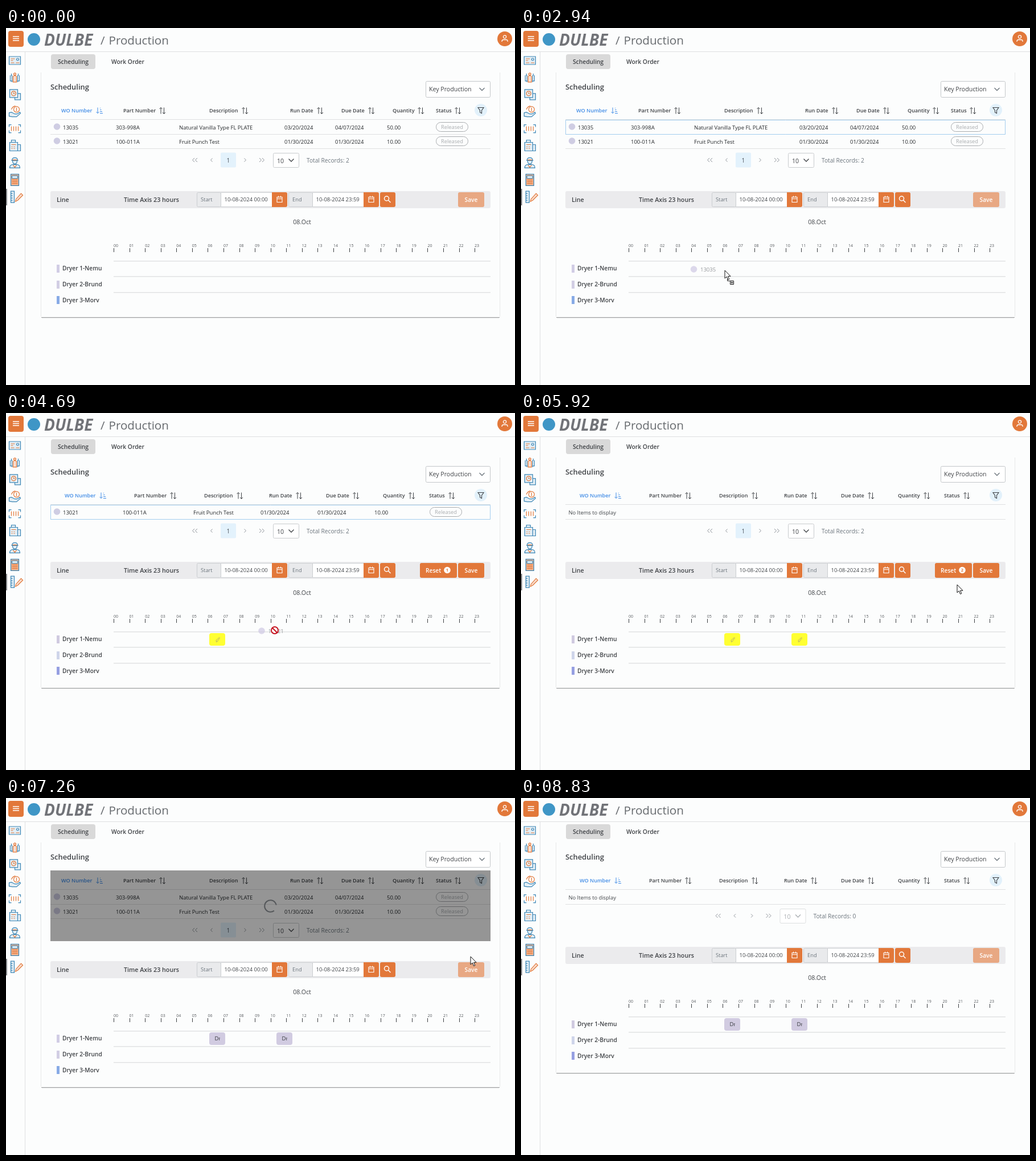
Animation of 894x626 px, one loop 9230 ms. Source, as an HTML page with a canvas:

```html
<!DOCTYPE html>
<html lang="en">
<head>
<meta charset="utf-8">
<title>Production scheduling</title>
<style>
html, body { margin: 0; width: 100%; height: 100%; overflow: hidden; background: #fcfdfd; }
canvas { display: block; }
</style>
</head>
<body>
<canvas id="stage" width="894" height="626"></canvas>
<script>
const g = document.getElementById('stage').getContext('2d');
const LOOP = 9230;
const ORANGE = '#e2783a', BLUE = '#3c86b5', INK = '#3f4246', GREY = '#6c757d', LINE = '#dfe0e1';
const FONT = '"Open Sans", "Noto Sans", sans-serif';

// y is the middle of the capital letters; whole-pixel baselines stay crisp
function text(s, x, y, size = 9.5, color = INK, weight = 400, align = 'left') {
  g.font = `${weight} ${size}px ${FONT}`;
  g.fillStyle = color;
  g.textAlign = align;
  g.fillText(s, x, Math.round(y + size * 0.36));
}
function box(x, y, w, h, r, fill, stroke) {
  g.beginPath();
  g.roundRect(x, y, w, h, r);
  if (fill) { g.fillStyle = fill; g.fill(); }
  if (stroke) { g.strokeStyle = stroke; g.lineWidth = 1; g.stroke(); }
}
function path(d, x, y, stroke, width = 1, fill) {
  const p = new Path2D(d);
  g.save();
  g.translate(x, y);
  if (fill) { g.fillStyle = fill; g.fill(p); }
  if (stroke) { g.strokeStyle = stroke; g.lineWidth = width; g.stroke(p); }
  g.restore();
}
function dot(x, y, r, fill, stroke, width = 1) {
  g.beginPath();
  g.arc(x, y, r, 0, 7);
  if (fill) { g.fillStyle = fill; g.fill(); }
  if (stroke) { g.strokeStyle = stroke; g.lineWidth = width; g.stroke(); }
}
const hline = (x, y, w, color = LINE) => { g.fillStyle = color; g.fillRect(x, y, w, 1); };
const chevron = (x, y, color = GREY) => path('M-4.5 -2L0 2.5L4.5 -2', x, y, color, 1.3);

// Sidebar icons: outline, colour and fill around a common centre
const PERSON = 'M-2 -6a2 2 0 1 0 4 0a2 2 0 1 0 -4 0M-3 8V-2Q0 -5 3 -2V8Z';
const icons = [
  [['M-10 -7H10V7H-10Z', BLUE, '#e3eef5'], ['M-7 -3H0M-7 0H-3M-7 4H-1M2 4H8', ORANGE], ['M3 -2a2 2 0 1 0 4 0a2 2 0 1 0 -4 0', BLUE]],
  [['M-8 -4V6H-4M8 -4V6H4M-6 -7V-3M6 -7V-3M-5 -4V8M5 -4V8', BLUE], [PERSON, ORANGE, '#f8ded0']],
  [['M-9 -9H5V5H-9ZM0 5V9H10V-2H5', BLUE, '#e3eef5'], ['M-6 -2a4 4 0 1 0 8 0a4 4 0 1 0 -8 0M-2 -4V-2H0', ORANGE]],
  [['M-2 -4a5 5 0 1 0 10 0a5 5 0 1 0 -10 0M3 -7V-1M-6 -4Q-4 -9 1 -10', ORANGE], ['M-10 2L-6 1L0 4H4L9 1L10 3L3 9H-5L-10 8Z', BLUE, '#e3eef5']],
  [['M-10 -3V-7H-6M6 -7H10V-3M10 3V7H6M-6 7H-10V3', BLUE], ['M-6 -4V4M-2 -4V4M2 -4V4M6 -4V4', ORANGE]],
  [['M-9 -6H5V9H-9ZM5 -2H10V9H5M-6 -6V-10H1V-6', BLUE, '#e3eef5'], ['M-6 -2H2M-6 2H-4M-2 2H0M-6 5H-4M-2 5H0', ORANGE]],
  [['M-5 -4Q-5 -9 0 -9T5 -4H-6H6M-4 -4Q-4 2 0 2T4 -4M-9 9Q-9 3 -3 3H3Q9 3 9 9Z', BLUE, '#e3eef5'], ['M-3 4L0 8L3 4M-4 -5H4', ORANGE]],
  [['M-7 -10H7V10H-7Z', BLUE, '#f3b38e'], ['M-5 -7H5V-3H-5Z', BLUE, '#fff'], ['M-5 0H5M-5 3H5M-5 6H5', ORANGE]],
  [['M-7 -10H-1V10H-7ZM-7 -6H-4M-7 -2H-4M-7 2H-4M-7 6H-4', BLUE, '#e3eef5'], ['M1 8L2 4L11 -6L14 -3L5 6Z', ORANGE, '#f8ded0']]
];

function shell() {
  g.fillStyle = '#fcfdfd';
  g.fillRect(0, 0, 894, 626);
  hline(0, 41, 894);
  g.fillRect(33, 41, 1, 585);
  box(4, 5, 27, 28, 4, ORANGE);
  path('M0 0H11M0 3.5H11M0 7H11', 12, 15, '#fff', 1.4);
  dot(49, 20, 11, '#3f96c6');
  text('DULBE', 67, 21, 28, '#717378', 'italic 700');
  text('/', 166, 22, 20.6, '#666a6e');
  text('Production', 180.5, 22, 20.6, '#666a6e');
  dot(876, 19, 13, ORANGE);
  path('M-2.6 -3a2.6 2.6 0 1 0 5.2 0a2.6 2.6 0 1 0 -5.2 0M-5 5.5V4.5Q-5 2 -2 2H2Q5 2 5 4.5V5.5', 876, 18.5, '#fff', 1.3);
  icons.forEach((parts, i) => parts.forEach(([d, color, fill]) => path(d, 15.5, 57 + i * 29.9, color, 1.2, fill)));
  g.fillStyle = '#85878a';
  g.fillRect(0, 282, 2, 29);
  box(79, 46, 78, 26, 4, '#d9d9d9');
  text('Scheduling', 118, 59.5, 10.3, INK, 600, 'center');
  text('Work Order', 214, 59.5, 10.3, INK, 600, 'center');
}

function card(dy) {
  g.fillStyle = '#e8e9e9';
  g.fillRect(61, 78, 1, 428 + dy);
  g.fillRect(867, 78, 1, 428 + dy);
  hline(62, 507 + dy, 805, '#a0a2a3');
  hline(63, 508 + dy, 803, '#e2e3e3');
  text('Scheduling', 78, 103, 12.9, INK, 600);
  box(737.5, 93.5, 113, 28, 2, '#fff', '#c3c6c9');
  text('Key Production', 743, 107.5, 10.6);
  chevron(836, 107);
}

const titles = ['WO Number', 'Part Number', 'Description', 'Run Date', 'Due Date', 'Quantity', 'Status'];
const wide = {
  heads: [97, 206, 357, 499, 589, 679, 755],
  sorts: [158, 269, 414, 546, 636, 723, 788],
  cells: [100, 193, 304, 489, 578, 669, 755]
};
const narrow = {
  heads: [103, 225, 348, 462, 562, 662, 743],
  sorts: [164, 288, 405, 509, 609, 707, 777],
  cells: [100, 205, 329, 447, 547, 647, 744]
};
const orders = [
  ['13035', '303-998A', 'Natural Vanilla Type FL PLATE', '03/20/2024', '04/07/2024', '50.00'],
  ['13021', '100-011A', 'Fruit Punch Test', '01/30/2024', '01/30/2024', '10.00']
];

function table(rows, dragging) {
  const cols = rows.length === 2 ? wide : narrow;
  titles.forEach((s, i) => {
    const color = i ? INK : '#3f8be6';
    text(s, cols.heads[i], 145, 9.1, color, 600);
    path(i ? 'M3 0V11M.5 2.5L3 0L5.5 2.5M8.5 0V11M6 8.5L8.5 11L11 8.5'
           : 'M3 0V10M.5 7.5L3 10L5.5 7.5M7 1H8M7 4H9.5M7 7H11M7 10H12', cols.sorts[i], 139.5, color);
  });
  dot(834, 144, 11, '#e2f1fb');
  path('M-5 -5H5L1.5 0V5L-1.5 3.5V0Z', 834, 144.5, INK, 1.1);
  hline(78, 160, 773);
  rows.forEach((row, r) => {
    const y = 174 + r * 25;
    dot(89.5, y - 1, 5.8, '#cfcde3');
    row.forEach((s, i) => text(s, cols.cells[i], y + 0.5, 9.5, '#24272a'));
    const x = cols.cells[6];
    box(x + 0.5, y - 8.5, 56, 16, 8, null, '#a9acaf');
    text('Released', x + 28.5, y, 9.3, '#a9acaf', 400, 'center');
    hline(78, y + 12, 773);
  });
  if (!rows.length) {
    text('No Items to display', 83.5, 174.5, 9.3);
    hline(78, 186, 773);
  }
  if (dragging) box(78.5, 161.5, 772, 25, 0, null, '#a3cdee');
}

function pager(dy, empty) {
  const y = 231.5 + dy, s = empty ? 14.5 : 0;
  const arrow = (d, x) => path(d, x, y, '#8d9399');
  arrow('M-1 -3.5L-4.5 0L-1 3.5M4 -3.5L.5 0L4 3.5', 332 + s);
  arrow('M1.5 -3L-1.5 0L1.5 3', 361 + s);
  arrow('M-1.5 -3L1.5 0L-1.5 3', 420 - s);
  arrow('M1 -3.5L4.5 0L1 3.5M-4 -3.5L-.5 0L-4 3.5', 449 - s);
  if (!empty) {
    box(377, y - 13, 27, 26, 2, '#e3f2fc');
    text('1', 390.5, y + 0.5, 10.2, '#49505a', 400, 'center');
  }
  const pale = empty ? '#a9adb1' : INK;
  box(469.5 - s, y - 12, 45, 25, 2, '#fff', empty ? '#dddfe0' : '#c8cbcd');
  text('10', 476 - s, y + 1.5, 10.5, pale);
  chevron(501 - s, y, pale);
  text('Total Records: ' + (empty ? 0 : 2), 528 - s, y + 0.5, 10.2, GREY);
}

function dateField(x, label, value, y) {
  box(x + 0.5, y + 0.5, 42, 25, 2, '#e9eaec', '#cbced1');
  text(label, x + 7, y + 13, 9.3, GREY);
  box(x + 42.5, y + 0.5, 90, 25, 0, '#fff', '#cbced1');
  text(value, x + 48.5, y + 13, 9.5, '#42464a');
  box(x + 132, y, 27, 26, [0, 3, 3, 0], ORANGE);
  path('M-4.5 -4H4.5V5H-4.5ZM-4.5 -1H4.5M-2 -6V-3M2 -6V-3', x + 145.5, y + 12.5, '#fff', 1.1);
}

function toolbar(dy, pending) {
  const y = 288 + dy;
  box(78, y - 2, 773, 30, 3, '#ebebed');
  text('Line', 89, y + 13.5, 10.7, INK, 600);
  text('Time Axis 23 hours', 207, y + 13.5, 10.7, INK, 600);
  dateField(335, 'Start', '10-08-2024 00:00', y);
  dateField(496, 'End', '10-08-2024 23:59', y);
  box(657, y, 27, 26, 3, ORANGE);
  path('M-5 -1a4 4 0 1 0 8 0a4 4 0 1 0 -8 0M2 2L6 6', 669.5, y + 12, '#fff', 1.5);
  if (pending) {
    box(727, y, 65, 26, 3, ORANGE);
    text('Reset', 737, y + 13.5, 10.2, '#fff', 600);
    dot(775, y + 12.5, 5.8, '#fff');
    text(String(pending), 775, y + 12.5, 7.5, ORANGE, 700, 'center');
  }
  box(794, y, 46, 26, 3, pending ? ORANGE : '#e8a883');
  text('Save', 817, y + 13.5, 10.2, '#fff', 600, 'center');
}

const lanes = ['Dryer 1-Nemu', 'Dryer 2-Brund', 'Dryer 3-Morv'];
function timeline(dy, count, saved) {
  text('08.Oct', 520, 340.5 + dy, 10.6, INK, 400, 'center');
  for (let h = 0; h < 24; h++) {
    const x = 189 + h * 27.57;
    text(String(h).padStart(2, '0'), x, 381.7 + dy, 7, '#55595d');
    g.fillStyle = '#3c3f42';
    g.fillRect(Math.round(x), 386 + dy, 1, 7);
  }
  const tints = dy ? ['#d0cae0', '#cfd5ea', '#969fe2'] : ['#d1cde5', '#d2cee4', '#88abe6'];
  lanes.forEach((name, i) => {
    const y = 421.8 + dy + i * 27.7;
    g.fillStyle = '#e2e3e4';
    g.fillRect(189, Math.round(407.5 + i * 27.7) + dy, 662, 1.5);
    g.fillStyle = tints[i];
    g.fillRect(89, Math.round(y - 7), 5, 14);
    text(name, 99, y, 10.2, INK, 600);
  });
  [357, 475].slice(0, count).forEach(x => {
    const y = 411 + dy;
    box(x, y, 28, 22, 4, saved ? '#d1cbe1' : '#ffff32');
    if (saved) {
      g.save();
      g.beginPath();
      g.rect(x + 8, y, 11, 22);
      g.clip();
      text('Dryer', x + 9.5, y + 11, 9.5, '#33363a');
      g.restore();
    } else path('M-2 4Q-4 1 0 -1L3 -4L4 -3L1 1Q0 4 -2 4Z', x + 14.5, y + 11.5, '#b5ac68', 1);
  });
}

function loading(t, dy) {
  g.fillStyle = 'rgba(0,0,0,.41)';
  g.fillRect(78, 127, 773, 124 + dy);
  const a = 0.9 + (t - 7260) * 0.006;
  g.beginPath();
  g.arc(464.5, 189.5 + dy / 2, 10.3, a, a + 5.2);
  g.strokeStyle = '#55585b';
  g.lineWidth = 2;
  g.stroke();
}

// Pointer moves: start, end, number of steps, evenly spaced points
const moves = [
  [1410, 2110, 6, [[238, 362], [180, 240], [142, 173]]],
  [2390, 2940, 5, [[142, 173], [235, 290], [358, 425]]],
  [3220, 4170, 8, [[358, 425], [320, 390], [185, 245], [114, 176], [112, 173]]],
  [4300, 5250, 8, [[112, 173], [230, 230], [360, 310], [471, 381], [475, 392], [475, 392], [475, 392], [475, 392]]],
  [5380, 6180, 7, [[475, 392], [630, 352], [766, 301], [816, 278]]],
  [8240, 8830, 5, [[816, 278], [820, 310], [832, 400], [862, 590], [880, 650]]]
];
function pointer(t) {
  const move = moves.filter(m => t >= m[0]).pop();
  if (!move) return null;
  const [start, end, steps, pts] = move, n = steps - 1;
  const step = Math.min(n, Math.floor((t + 20 - start) / (end - start) * n));
  const u = step / n * (pts.length - 1), i = Math.min(Math.floor(u), pts.length - 2);
  return pts[i].map((v, k) => v + (pts[i + 1][k] - v) * (u - i));
}

function cursor([x, y], rows, dragging, dy) {
  if (dragging) {
    const first = rows.length === 2, dx = first ? -54.5 : -22;
    const gy = y + (first ? -2 : 1);
    g.globalAlpha = 0.7;
    dot(x + dx, gy, 5.8, '#cfc8e3');
    text(rows[0][0], x + dx + 11.5, gy + 1, 9.5, '#686c70');
    g.globalAlpha = 1;
    if (y < 408 + dy) {
      dot(x + 1, y, 6, '#fff', '#c5121f', 2);
      path('M-4 -4L4 4', x + 1, y, '#c5121f', 2);
      return;
    }
  } else if (y > 161 && y < 161 + 25 * rows.length) {
    path('M-3 7L-7 1Q-7 -1 -5 0L-3 2V-4Q-2 -6 -1 -4V-6Q.5 -8 1.5 -6V-5Q3 -7 4 -4.5V-3Q6 -5 6.5 -2V2Q6 5 4 7ZM-1 -4V-1M1.5 -5V-1M4 -4V-1', x, y, '#111', 1.1, '#fff');
    return;
  }
  path('M0 0V14L3.3 11L5.5 16.5L7.8 15.6L5.5 10.3H10Z', x, y, '#111', 1, '#fff');
  if (dragging) {
    path('M4.5 13V18.5H10', x, y, '#333', 1);
    path('M9.5 18.5H15.5V24.5H9.5ZM12.5 19.5V23.5M10.5 21.5H14.5', x, y, '#111', 1, '#fff');
  }
}

function draw(t) {
  const rows = t < 3220 || (t >= 7000 && t < 7540) ? orders : t < 4980 ? orders.slice(1) : [];
  const dy = rows.length === 2 ? 0 : -25;
  const dragging = (t >= 2390 && t < 3220) || (t >= 4300 && t < 4980);
  const count = t < 3220 ? 0 : t < 4980 ? 1 : 2;
  const saved = t >= 6730;
  shell();
  card(dy);
  table(rows, dragging);
  pager(dy, t >= 7540);
  toolbar(dy, saved ? 0 : count);
  timeline(dy, count, saved);
  if (t >= 6460 && t < 7680) loading(t, dy);
  const at = pointer(t);
  if (at) cursor(at, rows, dragging, dy);
}

const begin = performance.now();
function tick() {
  draw((performance.now() - begin) % LOOP);
  requestAnimationFrame(tick);
}
tick();
</script>
</body>
</html>
```
